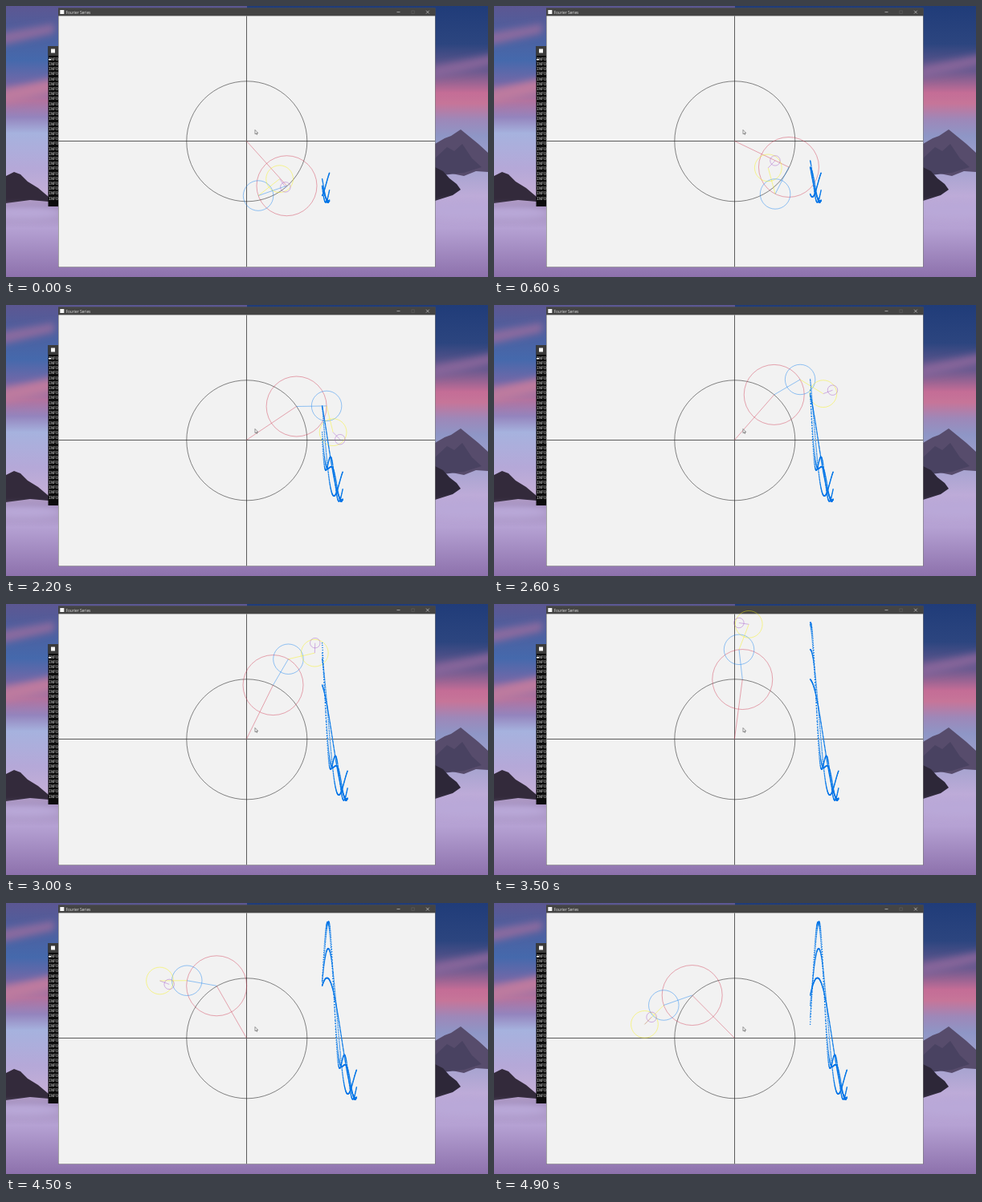
These frames come from a looping animation (600 px wide and 338 px high, 5000 ms). An HTML page with a canvas:

```html
<!DOCTYPE html>
<html lang="en">
<head>
<meta charset="utf-8">
<title>Fourier Series</title>
<style>
  html, body { margin: 0; width: 100%; height: 100%; overflow: hidden; background: #9477b2; }
  svg, canvas { position: absolute; left: 0; top: 0; width: 600px; height: 338px; }
</style>
</head>
<body>
<svg viewBox="0 0 600 338">
  <defs>
    <linearGradient id="west" x2="0" y2="1">
      <stop offset="0" stop-color="#5c5792"/>
      <stop offset=".1" stop-color="#4d5f9f"/>
      <stop offset=".2" stop-color="#4569ac"/>
      <stop offset=".28" stop-color="#7068a8"/>
      <stop offset=".35" stop-color="#b2739f"/>
      <stop offset=".41" stop-color="#9484bd"/>
      <stop offset=".47" stop-color="#a6b2de"/>
      <stop offset=".6" stop-color="#b5a8d8"/>
      <stop offset=".69" stop-color="#c3aed6"/>
      <stop offset=".74" stop-color="#a08bb8"/>
      <stop offset=".82" stop-color="#b5a1d3"/>
      <stop offset="1" stop-color="#8d71ac"/>
    </linearGradient>
    <linearGradient id="east" x2="0" y2="1">
      <stop offset="0" stop-color="#203c79"/>
      <stop offset=".14" stop-color="#2c457f"/>
      <stop offset=".24" stop-color="#69598f"/>
      <stop offset=".32" stop-color="#c46d96"/>
      <stop offset=".36" stop-color="#c67599"/>
      <stop offset=".42" stop-color="#9d88b9"/>
      <stop offset=".48" stop-color="#8e96c6"/>
      <stop offset=".6" stop-color="#a5a3cf"/>
      <stop offset=".7" stop-color="#bdabd8"/>
      <stop offset=".82" stop-color="#b5a1d3"/>
      <stop offset="1" stop-color="#8d71ac"/>
    </linearGradient>
    <filter id="soft" x="-50%" y="-50%" width="200%" height="200%"><feGaussianBlur stdDeviation="4"/></filter>
    <filter id="edge"><feGaussianBlur stdDeviation=".6"/></filter>
  </defs>
  <rect width="300" height="338" fill="url(#west)"/>
  <rect x="300" width="300" height="338" fill="url(#east)"/>
  <g filter="url(#soft)">
    <path d="M-10 34L60 22V34L-10 50Z" fill="#8a6a9f"/>
    <path d="M-10 106L60 90V108L-10 124Z" fill="#bd7a9f"/>
    <path d="M530 76L610 60V72L530 92Z" fill="#86659a"/>
  </g>
  <g filter="url(#edge)">
    <path d="M534 172L546 165L554 162L566 154L577 163L588 172L600 183V207L585 206L570 212L550 208L534 214Z" fill="#574c6c"/>
    <path d="M534 190L549 176L558 181L568 172L580 190L592 201L570 208L534 212Z" fill="#494261"/>
    <path d="M534 201L544 206L552 215L561 222L566 229L556 236L534 243Z" fill="#2d2738"/>
    <path d="M0 212L10 207L18 210L27 219L40 227L53 238V244L30 242L0 246Z" fill="#332a3b"/>
  </g>
  <g filter="url(#soft)" fill="#b9a8d8">
    <ellipse cx="20" cy="258" rx="50" ry="8"/>
    <ellipse cx="575" cy="254" rx="50" ry="10"/>
  </g>

  <rect x="52.5" y="50" width="14" height="200" fill="#0c0c0c"/>
  <rect x="52.5" y="50" width="14" height="12" fill="#3b3b3b"/>
  <rect x="56" y="53.5" width="5" height="5" fill="#f5f5f5"/>
  <g id="log" fill="#ccc" font-family="'DejaVu Sans Mono', monospace" font-size="5"></g>
  <rect x="53" y="66" width="3" height="1.3" fill="#fff"/>

  <rect x="65" y="2.5" width="469.5" height="323.2" fill="#555"/>
  <rect x="65" y="2.5" width="469.5" height="10" fill="#444"/>
  <rect x="65.5" y="12.4" width="468.6" height="313" fill="#f2f2f2"/>
  <rect x="67.3" y="5" width="5" height="5" fill="#f5f5f5"/>
  <text x="74.5" y="9.5" font-family="'Open Sans', sans-serif" font-size="4.8" fill="#e0e0e0">Fourier Series</text>
  <path d="M486.5 7.6h4M523 5.7l3.8 3.8M526.8 5.7l-3.8 3.8" fill="none" stroke="#e0e0e0" stroke-width=".6"/>
  <path d="M504.8 5.8h3.6v3.6h-3.6z" fill="none" stroke="#666" stroke-width=".5"/>
  <path d="M65.5 168.5H534M299.5 12.4V325.3" stroke="#5c5c5c"/>
  <circle cx="299.8" cy="168.8" r="75" fill="none" stroke="#222" stroke-width=".55"/>
</svg>
<canvas id="stage" width="600" height="338"></canvas>
<svg viewBox="0 0 600 338">
  <path d="M310 154.5v5.2l1.2-1 .8 1.7 .9-.4-.8-1.6h1.6z" fill="#fff" stroke="#333" stroke-width=".5"/>
</svg>
<script>
const log = document.getElementById('log');
for (let i = 0; i < 29; i++) {
  log.innerHTML += `<text x="52.9" y="${67.8 + i * 6.21}">INFO</text>`;
}

const ctx = document.getElementById('stage').getContext('2d');
const CX = 299.4, CY = 168.4, TRACE_X = 393.6, TRACE_SPEED = 7.5, START = -1.2, RATE = 40;

// length, degrees per second, angle at time 0, colour
const arms = [
  [75, 37.3, -48.1, '#d0304c'],
  [37.5, 73.5, -160.8, '#0079f1'],
  [33.75, 111.6, 38.2, '#f8f400'],
  [12.5, 167.5, -54.5, '#a050c8'],
];

// Joint positions of the whole chain at time t
function joints(t) {
  let x = CX, y = CY;
  return arms.map(([len, speed, phase]) => {
    const a = (phase + speed * t) * Math.PI / 180;
    x += len * Math.cos(a);
    y -= len * Math.sin(a);
    return [x, y];
  });
}

function draw(t) {
  ctx.clearRect(0, 0, 600, 338);
  ctx.lineWidth = 0.42;
  let from = [CX, CY];
  joints(t).forEach((to, i) => {
    const [len, , , colour] = arms[i];
    ctx.strokeStyle = colour;
    ctx.beginPath();
    ctx.moveTo(...from);
    ctx.lineTo(...to);
    ctx.moveTo(to[0] + len / 2, to[1]);
    ctx.arc(...to, len / 2, 0, 2 * Math.PI);
    ctx.stroke();
    from = to;
  });

  ctx.fillStyle = '#0075e6';
  const count = Math.round((t - START) * RATE);
  for (let k = 0; k <= count; k++) {
    const age = k / RATE;
    for (const [, y] of joints(t - age)) {
      ctx.beginPath();
      ctx.arc(TRACE_X + age * TRACE_SPEED, y, 0.75, 0, 2 * Math.PI);
      ctx.fill();
    }
  }
}

function tick() {
  draw(Math.floor(performance.now() % 5000 / 100) / 10);
  requestAnimationFrame(tick);
}
tick();
</script>
</body>
</html>
```
